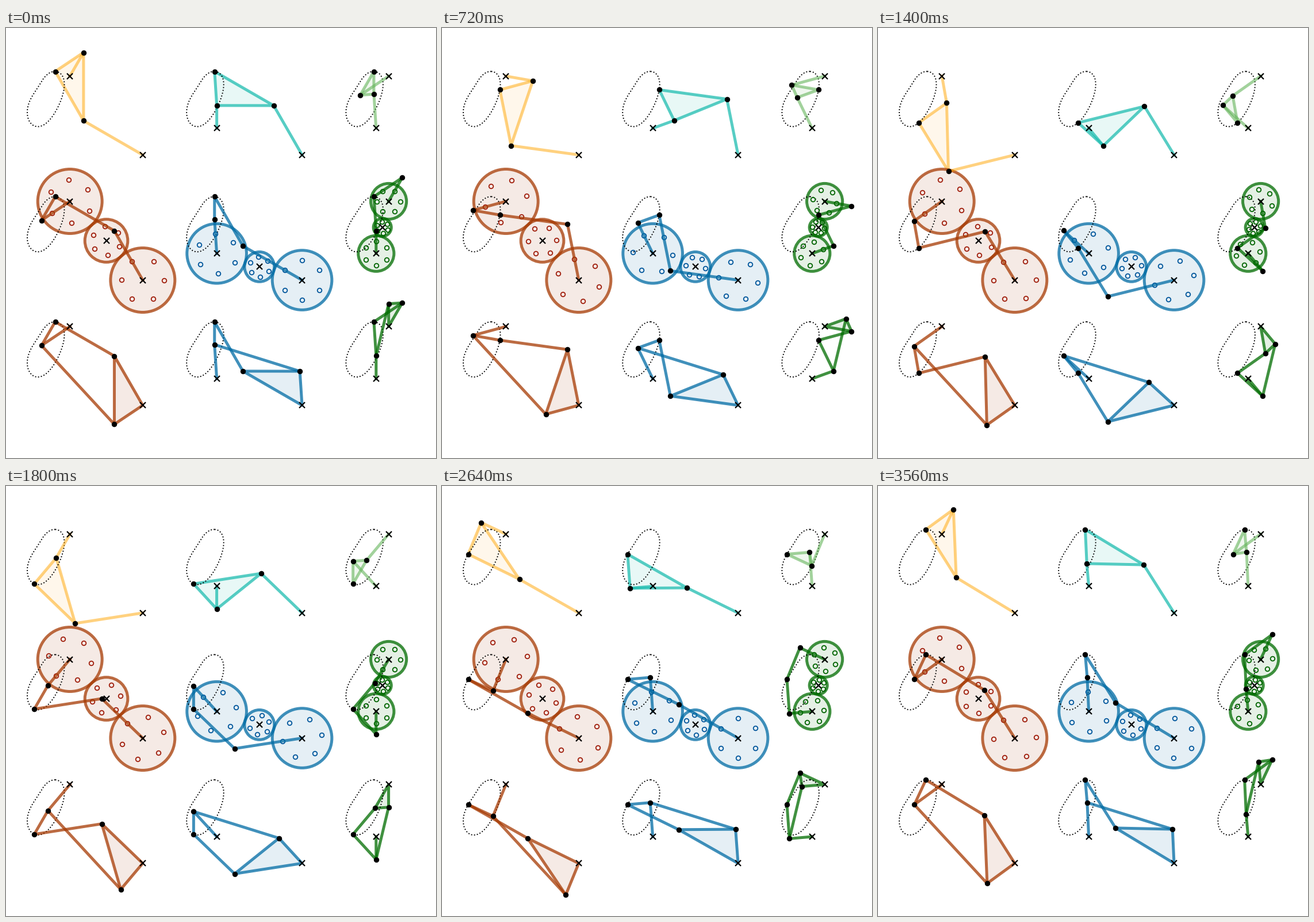
A matplotlib script that plays this animation: 748x748 px, repeating every 3.6 s.

```python
import numpy as np
import matplotlib.pyplot as plt
from matplotlib.animation import FuncAnimation
from matplotlib.colors import to_rgba
from matplotlib.patches import Circle, Polygon

SIZE, DPI = 748, 100
UNIT = 39.6                    # pixels per length unit
ORIGIN = 111.2, 83.7           # pixel position of pivot A in the first panel
PX = 72 / DPI                  # one pixel in points
POSES, TICKS, TICK_MS = 72, 90, 40
IDLER_START = np.radians(35.3)


def polar(r, degrees):
    return r * np.exp(1j * np.radians(degrees))


# Coupler triangle with sides 3, 2.5 and 1.5; W places P on the base DE.
W = 0.5 * np.exp(-1j * np.arccos(5 / 9))
A = 0j
B = polar(1.2, 60) - 3j - polar(3, 150)
C = W * B
PIVOTS = "ABC"


def solve(degrees):
    """All joints of the linkage family for a given crank angle."""
    crank = polar(1.2, degrees)
    D = A + crank
    span = B - D
    height = np.sqrt(9 - np.abs(span) ** 2 / 4)
    E = D + span / 2 - 1j * height * span / np.abs(span)
    base, rocker = E - D, E - B
    P = D + W * base
    return dict(
        A=A, B=B, C=C, D=D, E=E, P=P,
        F=A + W * base, G=C + W * rocker,
        H=B + (W - 1) * base, I=C + (1 - W) * crank,
        Q=B + W * base, R=B + W * rocker, S=A + (1 - W) * crank,
    )


START = solve(60.0)
CURVE = solve(np.linspace(60, -300, 361))["P"]

RUST, BLUE, GREEN = "#a63a03", "#006ba4", "#006c00"
HOLES = {RUST: "#a01e0c", BLUE: "#00569c", GREEN: "#006400"}

# column, row, colour, alpha, links, filled triangle, gear cranks, gear share
PANELS = [
    (0, 0, "#ffa500", 0.50, "AD EB", "DEP", "", 0),
    (1, 0, "#1fbdb0", 0.75, "CI HB", "IHP", "", 0),
    (2, 0, "#64b45a", 0.60, "AF GC", "FGP", "", 0),
    (0, 1, RUST, 0.75, "AF FP PH HB", "", "AF BH", 0.3),
    (1, 1, BLUE, 0.75, "CG GP PE EB", "", "CG BE", 1 / 3),
    (2, 1, GREEN, 0.75, "AD DP PI IC", "", "AD CI", 1 / 3),
    (0, 2, RUST, 0.75, "AF FP PH FQ", "BHQ", "", 0),
    (1, 2, BLUE, 0.75, "CG GP PE GR", "BER", "", 0),
    (2, 2, GREEN, 0.75, "CI IP PD IS", "ADS", "", 0),
]


def xy(z):
    z = np.atleast_1d(z)
    return np.column_stack([z.real, z.imag])


class Gear:
    """A disc with six holes."""

    def __init__(self, ax, centre, radius, color, alpha):
        self.centre, self.radius = centre, radius
        ax.add_patch(Circle((centre.real, centre.imag), radius, lw=5 * PX,
                            ec=to_rgba(color, alpha), fc=to_rgba(color, 0.1)))
        self.holes, = ax.plot([], [], "o", ms=7.6 * PX, mew=1.8 * PX,
                              mfc="none", mec=HOLES[color])

    def turn(self, angle):
        spokes = angle + np.arange(6) * np.pi / 3
        z = self.centre + self.radius * 2 / 3 * np.exp(1j * spokes)
        self.holes.set_data(z.real, z.imag)


class Panel:
    def __init__(self, ax, col, row, color, alpha, links, tri, cranks, share):
        self.shift = shift = 7 * col - 5.5j * row
        self.links, self.tri, self.cranks = links.split(), tri, cranks.split()
        curve = CURVE + shift
        ax.plot(curve.real, curve.imag, ":", color="black", lw=1.9 * PX)

        fixed = [START[n] for n in PIVOTS if n in links + tri]
        if tri:
            self.plate = ax.add_patch(Polygon(
                np.zeros((3, 2)), closed=True, lw=5 * PX, joinstyle="round",
                ec=to_rgba(color, alpha), fc=to_rgba(color, 0.1 if alpha > 0.5 else 0.08)))
        if cranks:
            ends = [START[c[0]] for c in self.cranks]
            span = abs(ends[1] - ends[0])
            middle = sum(ends) / 2
            big, small = share * span, (0.5 - share) * span
            self.ratio = big / small
            self.gears = [Gear(ax, z + shift, big, color, alpha) for z in ends]
            self.idler = Gear(ax, middle + shift, small, color, alpha)
            fixed.append(middle)

        self.bars = [ax.plot([], [], color=color, alpha=alpha, lw=5 * PX)[0]
                     for _ in self.links]
        self.moving = sorted(set("".join(self.links) + tri) - set(PIVOTS))
        self.dots, = ax.plot([], [], "o", color="black", ms=8.4 * PX,
                             mew=1 * PX, zorder=3)
        z = np.array(fixed) + shift
        ax.plot(z.real, z.imag, "x", color="black", ms=10.8 * PX,
                mew=2.2 * PX, zorder=3)

    def place(self, joints, names):
        return np.array([joints[n] for n in names]) + self.shift

    def update(self, joints):
        for bar, names in zip(self.bars, self.links):
            z = self.place(joints, names)
            bar.set_data(z.real, z.imag)
        z = self.place(joints, self.moving)
        self.dots.set_data(z.real, z.imag)
        if self.tri:
            self.plate.set_xy(xy(self.place(joints, self.tri)))
        if self.cranks:
            for gear, (pivot, tip) in zip(self.gears, self.cranks):
                arm = joints[tip] - joints[pivot]
                gear.turn(np.angle(arm))
            turned = np.angle(arm / (START[tip] - START[pivot]))
            self.idler.turn(IDLER_START - self.ratio * turned)


fig = plt.figure(figsize=(SIZE / DPI, SIZE / DPI), dpi=DPI, facecolor="white")
ax = fig.add_axes([0, 0, 1, 1])
ax.axis("off")
ax.set_xlim(-ORIGIN[0] / UNIT, (SIZE - ORIGIN[0]) / UNIT)
ax.set_ylim((ORIGIN[1] - SIZE) / UNIT, ORIGIN[1] / UNIT)
panels = [Panel(ax, *spec) for spec in PANELS]


def draw(tick):
    # 72 poses spread over 90 clock ticks, so every fourth pose is held
    pose = (4 * tick + 1) // 5
    joints = solve(60 - 360 / POSES * pose)
    for panel in panels:
        panel.update(joints)
    return []


anim = FuncAnimation(fig, draw, frames=TICKS, interval=TICK_MS, repeat=True)
plt.show()
```
